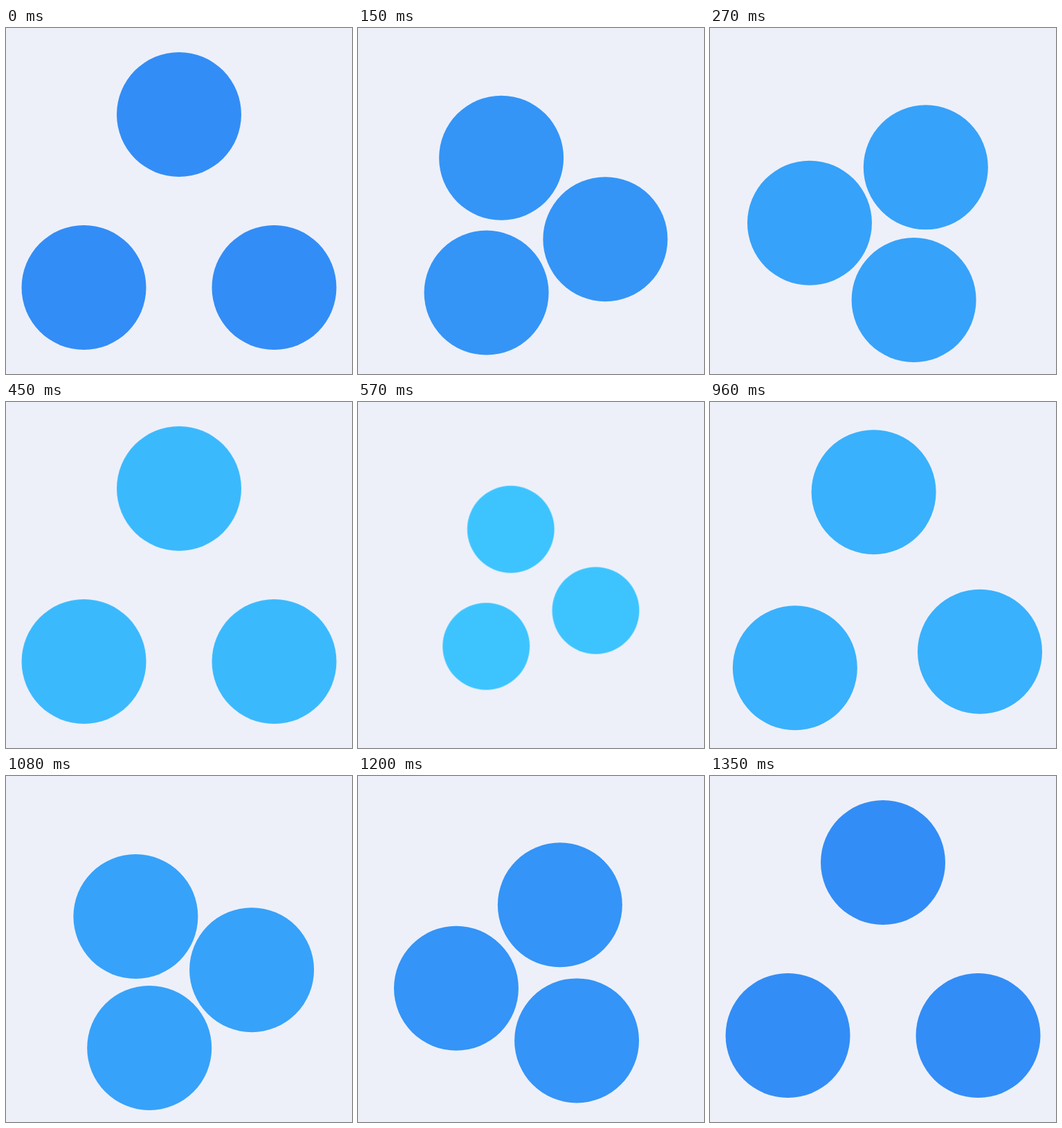
An HTML page without scripts that plays this animation: 500 px wide and 500 px high, repeating every 1380 ms.

```html
<!DOCTYPE html>
<html lang="en">
<head>
<meta charset="utf-8">
<title>Three orbiting dots</title>
<style>
  html, body {
    margin: 0;
    width: 100%;
    height: 100%;
    overflow: hidden;
    background: #edf0f9;
  }

  .stage, .dot {
    position: absolute;
    top: 0;
    left: 0;
    animation: 1380ms cubic-bezier(.3333, 0, .6667, 1) infinite;
  }

  .stage {
    width: 500px;
    height: 500px;
    color: #338df6;
    animation-name: pulse, tint;
  }

  .dot {
    width: 180px;
    height: 180px;
    border-radius: 50%;
    background: currentColor;
    offset-rotate: 0deg;
    offset-path: var(--first);
    animation-name: travel;
  }

  /* Each dot repeats one side of the triangle; corners join smoothly. */
  .left {
    --first: path("M250 125C227.083 166.667 89.583 333.333 112.5 375");
    --second: path("M250 125C204.167 125 89.583 333.333 112.5 375");
    --third: path("M250 125C204.167 125 135.417 333.333 112.5 375");
  }

  .bottom {
    --first: path("M112.5 375C158.333 375 364.583 416.667 387.5 375");
    --second: path("M112.5 375C135.417 416.667 364.583 416.667 387.5 375");
    --third: path("M112.5 375C135.417 416.667 341.667 375 387.5 375");
  }

  .right {
    --first: path("M387.5 375C364.583 333.333 295.833 125 250 125");
    --second: path("M387.5 375C410.417 333.333 295.833 125 250 125");
    --third: path("M387.5 375C410.417 333.333 272.917 166.667 250 125");
  }

  /* Three 450 ms legs, then a 30 ms rest. */
  @keyframes travel {
    0% { offset-path: var(--first); offset-distance: 0%; }
    32.6087% { offset-path: var(--first); offset-distance: 100%; }
    32.6088% { offset-path: var(--second); offset-distance: 0%; }
    65.2174% { offset-path: var(--second); offset-distance: 100%; }
    65.2175% { offset-path: var(--third); offset-distance: 0%; }
    97.8261%, 100% { offset-path: var(--third); offset-distance: 100%; }
  }

  @keyframes pulse {
    0%, 32.6087%, 65.2174%, 100% { transform: scale(1); }
    48.04% { transform: scale(.5); }
  }

  @keyframes tint {
    0%, 97.8261%, 100% { color: #338df6; }
    48.913% { color: #3ec8ff; }
  }
</style>
</head>
<body>
  <div class="stage">
    <div class="dot left"></div>
    <div class="dot bottom"></div>
    <div class="dot right"></div>
  </div>
</body>
</html>
```
